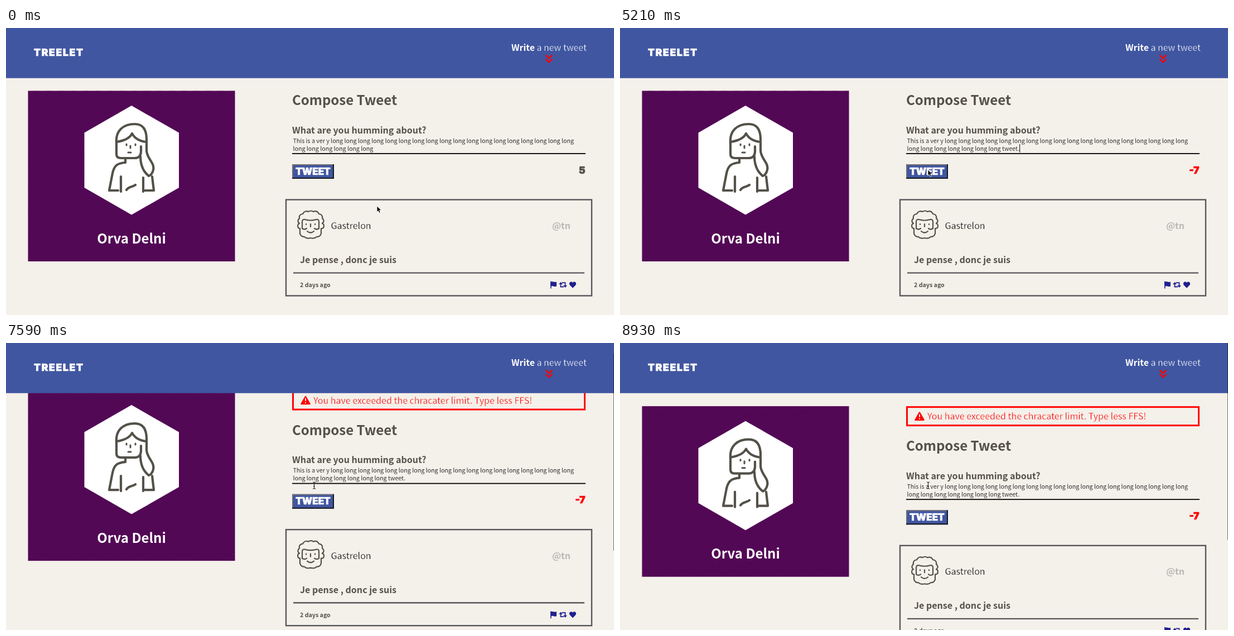
An HTML page for the animation above (9.08 s loop, 1090 by 514 pixels).

```html
<!DOCTYPE html>
<html lang="en">
<head>
<meta charset="utf-8">
<title>Compose</title>
<style>
  html, body { margin: 0; width: 100%; height: 100%; overflow: hidden; background: #f4f0ea; }
  svg { display: block; }
  text { font-family: "Noto Sans CJK JP", "Noto Sans CJK SC", "Source Sans Pro", "Open Sans", sans-serif; font-size: 16px; white-space: pre; }
  .bold { font-weight: 700; fill: #545149; }
  .big { font-size: 24px; }
  .note { font-size: 10.65px; }
  .light { stroke: #f4f0ea; stroke-width: .35; }
  .note.light { stroke-width: .2; }
  .block { font-family: Inter, "DejaVu Sans", sans-serif; font-weight: 900; font-size: 17.5px; stroke-width: .7; }
  .white { fill: #fff; }
  .ink { fill: none; stroke: #545149; stroke-linecap: round; stroke-linejoin: round; }
</style>
</head>
<body>
<svg width="1090" height="514" viewBox="0 0 1090 514">
  <defs>
    <pattern id="weave" width="22" height="22" patternUnits="userSpaceOnUse">
      <g fill="none" stroke="#470449" stroke-opacity=".4">
        <circle cx="11" cy="11" r="9"/><circle cx="11" cy="11" r="5"/>
      </g>
    </pattern>
    <g id="card">
      <rect x="502" y="307.5" width="548" height="172" fill="none" stroke="#57565a" stroke-width="2.4"/>
      <g class="ink" stroke-width="2.2">
        <path d="M526 350c-4-3-3-7 0-9c-1-5 2-8 6-8c2-4 6-6 10-4c3-2 7-2 9 0c5-2 8 0 10 4c4 0 7 3 6 8c3 2 4 6 0 9"/>
        <path d="M531 359V347Q531 342 536 343Q546 346 556 343Q561 342 561 347V359"/>
        <path d="M526 350c-4 1-4 9 1 9M567 350c4 1 4 9-1 9"/>
        <path d="M527 359V368c1 4 4 6 8 6c3 3 7 3 11 2c4 1 8 1 11-2c4 0 7-2 8-6V359"/>
        <path d="M531 359q4 3 8 0M561 359q-4 3-8 0M540 364q6 5 12 0M538 351v1M554 351v1M546 351v5"/>
      </g>
      <text x="582.5" y="360" class="light">Gastrelon</text>
      <text x="1012" y="360" class="bold" text-anchor="end" style="fill:#bab7b3">@tn</text>
      <text x="527" y="421" class="bold">Je pense , donc je suis</text>
      <path d="M515 438.6H1037" stroke="#57565a" stroke-width="2.4"/>
      <text x="527" y="464" class="bold note">2 days ago</text>
      <g fill="#20208f">
        <path d="M976 453.5h1.6v1.3c3-1.5 5 1.2 9.4-.4v8c-4 1.7-6-1.3-9.4.2v4H976z"/>
        <path d="M1016 465.8l-5.2-5.4c-3-4 2.2-8 5.2-4.4c3-3.6 8.2.4 5.2 4.4z"/>
        <path d="M994.5 458v5.500h5.500M996.500 456.200h6v5.500" fill="none" stroke="#20208f" stroke-width="1.800"/>
        <path d="M991 459l3.500-4l3.500 4zM999 461l3.500 4l3.500-4z"/>
      </g>
    </g>
  </defs>

  <rect width="1090" height="514" fill="#f4f0ea"/>

  <g id="profile">
    <rect x="39.500" y="112.500" width="371" height="305.500" fill="#530856"/>
    <rect x="39.500" y="112.500" width="371" height="305.500" fill="url(#weave)"/>
    <path d="M225 139L310 187.500V286L225 334.500L140.500 286V187.500Z" fill="#fff"/>
    <g class="ink" stroke-width="4.200">
      <path d="M198 206C196 184 210 172 231 172C248 172 252 186 252 200V219C252 234 267 241 264 254C263 260 259 264 256 265C247 258 241 246 241 230"/>
      <path d="M198 204V226Q198 233 206 233H231Q241 233 242 222V212"/>
      <path d="M198 204C212 202 222 197 226 189C231 198 240 203 252 204"/>
      <path d="M214 234V241C200 242 194 246 191 260L185 291H201M206 266V293M262 266L265 291H249M246 268V293M216 290C219 284 227 285 232 281"/>
      <path d="M216 208v2M232 208v2M223 211v4M219 223h5" stroke-width="3"/>
    </g>
    <text x="225" y="385.500" class="bold big" text-anchor="middle" style="fill:#fff">Orva Delni</text>
  </g>

  <g id="error">
    <svg x="513" y="112.500" width="526" height="36" id="shade">
      <path d="M24 11.500L31.500 24.500H16.500Z" fill="red" stroke="red" stroke-width="2.500" stroke-linejoin="round"/>
      <path d="M24 14.500v5M24 21.500v2" stroke="#f4f0ea" stroke-width="2"/>
      <text x="38" y="24" class="light" fill="red">You have exceeded the chracater limit. Type less FFS!</text>
    </svg>
    <rect id="frame" x="514.500" y="114" width="523" height="33" fill="none" stroke="red" stroke-width="3"/>
  </g>

  <g id="column">
    <text x="513" y="138" class="bold big">Compose Tweet</text>
    <text x="513" y="188.500" class="bold">What are you humming about?</text>
    <text x="514.500" y="205.500" class="note light" id="line1"></text>
    <text x="514.500" y="219.700" class="note light" id="line2"></text>
    <rect id="caret" y="208" width="1" height="15"/>
    <rect x="513" y="224" width="526" height="1.800"/>
    <rect x="513" y="244" width="75" height="26" fill="#4056a1"/>
    <path d="M514 270V245H588" fill="none" stroke="#6d6d72" stroke-width="2"/>
    <path d="M513 269H587V244" fill="none" stroke="#17171c" stroke-width="2"/>
    <text x="550.500" y="262.800" class="block white" stroke="#fff" text-anchor="middle" style="font-size:17px">TWEET</text>
    <text x="1038.500" y="260.700" class="block" id="count" text-anchor="end"></text>
    <use href="#card"/>
    <use href="#card" y="211"/>
  </g>

  <rect width="1090" height="89.800" fill="#4056a1"/>
  <text x="50" y="49.500" class="block white" stroke="#fff" letter-spacing="1.700">TREELET</text>
  <text x="1041" y="41" class="white" text-anchor="end" style="font-size:15.900px"><tspan font-weight="700">Write</tspan><tspan class="light" style="stroke:#4056a1"> a new tweet</tspan></text>
  <path d="M967.500 48.500l6 5.500l6-5.500M967.500 55.500l6 5.500l6-5.500" fill="none" stroke="red" stroke-width="2.400"/>

  <rect id="thumb" x="1089" width="1" height="353" fill="#000" fill-opacity=".55"/>
  <path id="arrow" d="M0 0V10.500L2.400 8.300L4.200 12.300L6.200 11.400L4.500 7.500H8Z" stroke="#fff" stroke-width=".8"/>
  <path id="beam" d="M-2.500-6Q0-6 0-4.500Q0-6 2.500-6M0-4.500V4.500M-2.500 6Q0 6 0 4.500Q0 6 2.500 6M-1.500 1.500H1.500" fill="none" stroke="#222" stroke-width="1.100"/>
</svg>

<script>
const LOOP = 9080, STEPS = 61, STEP = LOOP / STEPS;
const TYPED = " long tweet.";
const $ = id => document.getElementById(id);
const clamp = v => Math.min(1, Math.max(0, v));
const swing = v => .5 - Math.cos(Math.PI * clamp(v)) / 2;
const show = (id, on) => $(id).setAttribute("visibility", on ? "visible" : "hidden");
const move = (id, x, y) => $(id).setAttribute("transform", `translate(${x} ${y})`);

// Eased value between [step, ...values] keys.
function along(keys, n) {
  const i = keys.findIndex(k => k[0] > n);
  if (i === 0) return keys[0].slice(1);
  if (i < 0) return keys[keys.length - 1].slice(1);
  const a = keys[i - 1], b = keys[i];
  const p = swing((n - a[0]) / (b[0] - a[0]));
  return a.slice(1).map((v, j) => v + (b[j + 1] - v) * p);
}

const POINTER = [[0, 665, 319], [6, 675, 220], [8, 675, 220], [10, 676, 213],
  [31, 676, 213], [35, 552, 254], [45, 552, 254], [46, 552.5, 255]];
const SCROLL = [[49, 0], [54.5, 95.5], [57, -4], [60.5, -.5]];

function typedCount(n) {
  if (n < 21) return Math.max(0, n - 12);
  return 8 + (n >= 22) + (n >= 23) + (n >= 25) + (n >= 27);
}

$("line1").textContent = "This is a ver y " + "long ".repeat(18).trim();

function draw(t) {
  const n = Math.min(STEPS - 1, Math.floor(t / STEP + .1));
  const [scroll] = along(SCROLL, n);

  const open = n >= 39;
  const slide = swing((n * STEP - 5820) / 600);
  const push = open ? 6 + 48.6 * slide : 0;
  const high = 6 + 30 * slide;
  show("error", open);
  $("shade").setAttribute("height", high);
  $("frame").setAttribute("height", high - 3);
  move("error", 0, -scroll);
  move("profile", 0, -scroll);
  move("column", 0, push - scroll);

  const typed = typedCount(n), left = 5 - typed;
  const line = $("line2"), count = $("count");
  line.textContent = "long ".repeat(6).trim() + TYPED.slice(0, typed);
  $("caret").setAttribute("x", 514.5 + line.getComputedTextLength());
  show("caret", n >= 8 && n < 39 && !(n >= 30 && n < 33));
  count.textContent = left;
  const tone = left < 0 ? "red" : "#545149";
  count.setAttribute("fill", tone);
  count.setAttribute("stroke", tone);

  const [x, y] = along(POINTER, n);
  const over = (n < 39 && y < 224) || n >= 41;
  show("arrow", !over);
  show("beam", over);
  move("arrow", x, y);
  move("beam", x, y);

  show("thumb", n >= 50);
  $("thumb").setAttribute("y", .68 * scroll);
}

const start = performance.now();
function tick() {
  draw((performance.now() - start) % LOOP);
  requestAnimationFrame(tick);
}
tick();
</script>
</body>
</html>
```
